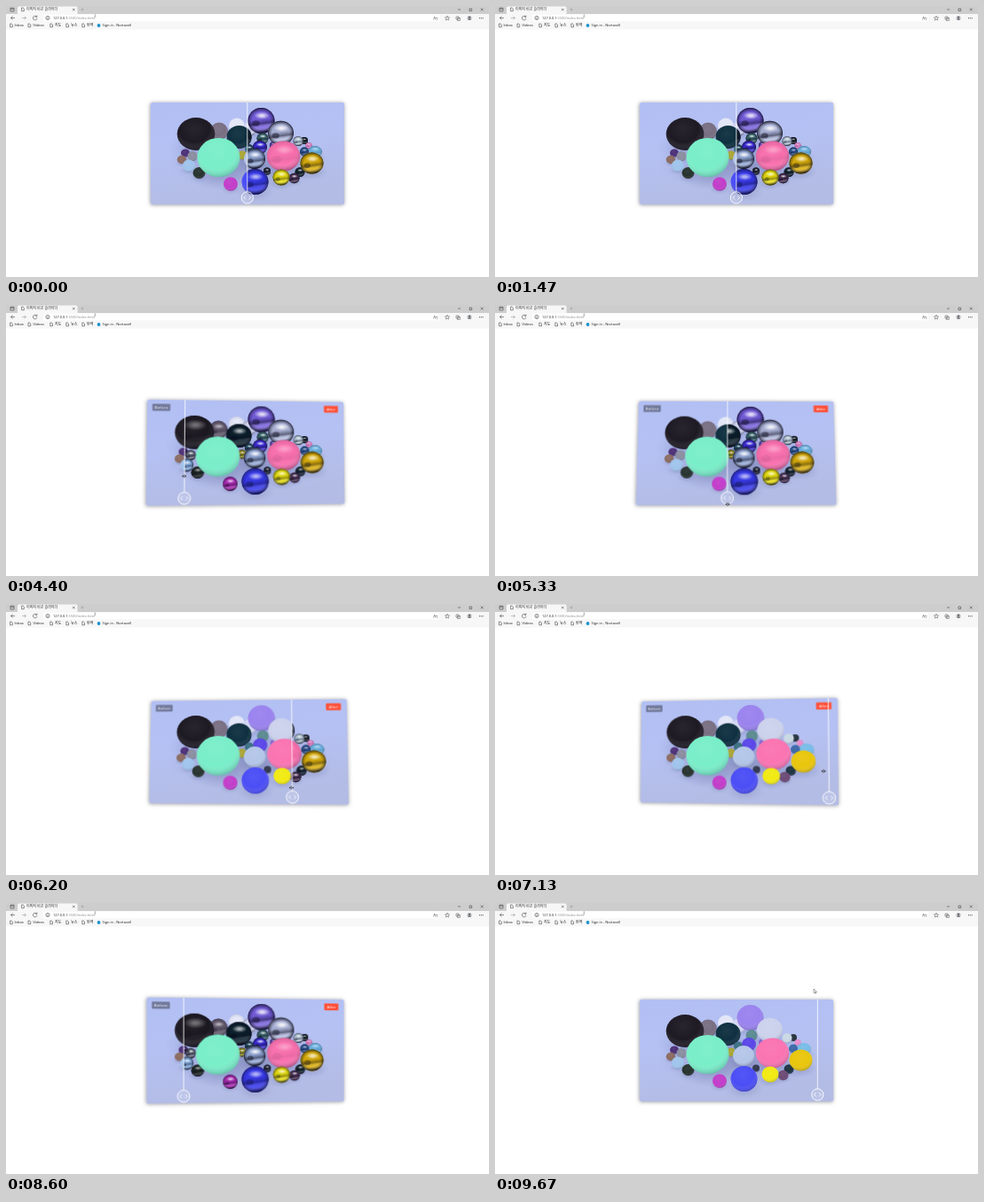
An HTML page that plays this animation: 544 px wide and 306 px high, repeating every 9.74 s.

```html
<!DOCTYPE html>
<html lang="ko">
<head>
<meta charset="utf-8">
<style>
html, body { margin: 0; width: 100%; height: 100%; overflow: hidden; background: #fff; }
svg { position: absolute; left: 0; top: 0; overflow: visible; }
text { font-family: "Open Sans", "Noto Sans CJK KR", "Noto Sans CJK", sans-serif; }
#card { position: absolute; left: 162.7px; top: 109.2px; width: 217.5px; height: 114.5px;
  border-radius: 1.5px; box-shadow: -.4px .4px 4px rgba(35, 38, 60, .5); }
#card svg { width: 217.5px; height: 114.5px; }
#card .scene { overflow: hidden; border-radius: 1.5px; }
.deepen { mix-blend-mode: multiply; }
</style>
</head>
<body>
<svg width="544" height="306" fill="none" stroke="#444" stroke-width=".6">
  <g stroke="none">
    <path fill="#cdcdcd" d="M0 0H544V9H0Z"/>
    <path fill="#f7f7f7" d="M0 9H13V2q0-1.5 1.5-1.5H79q1.5 0 1.5 1.5V9H544V26.5H0Z"/>
    <rect x="42" y="9.8" width="446" height="7.4" rx="1.2" fill="#fff"/>
    <circle cx="104.5" cy="22" r="1.9" fill="#1b93cf"/>
    <circle cx="522" cy="13.5" r="2.6" fill="#b9bcc2"/>
    <circle cx="522" cy="12.8" r="1" fill="#555"/>
    <path fill="#555" d="M520.2 15.5q1.8-2.6 3.6 0Z"/>
    <g fill="#222" font-size="4">
      <text x="23" y="5.4">이미지 비교 슬라이더</text>
      <text x="53" y="15" font-size="3.9">127.0.0.1<tspan fill="#8a8a8a">:5500/index.html</tspan></text>
      <text x="9.5" y="23.4">Inbox</text>
      <text x="30.5" y="23.4">Videos</text>
      <text x="55" y="23.4">지도</text>
      <text x="73" y="23.4">뉴스</text>
      <text x="91" y="23.4">번역</text>
      <text x="108.5" y="23.4">Sign in - Nortavell</text>
    </g>
    <path fill="#444" d="M533 13.2h1v1h-1zM534.8 13.2h1v1h-1zM536.6 13.2h1v1h-1z"/>
  </g>
  <path d="M5 2.2H9V6H5ZM5 3.3H9M75 2.8l2.6 2.6M77.6 2.8L75 5.4M509 4h3M522 3h2.6v2.6H522ZM534.8 2.6l2.8 2.8M537.6 2.6l-2.8 2.8"/>
  <path stroke="#999" d="M84.5 4h3M86 2.5v3M18 13.5h4.5M20.7 11.7l1.8 1.8-1.8 1.8"/>
  <path d="M10 13.5H5.5M7.5 11.5l-2 2 2 2M34.6 12.2A2.3 2.3 0 1 0 35 14M34.9 10.6v1.8h-1.8M47 13v2M47 11.8v.6"/>
  <circle cx="47" cy="13.5" r="2.1"/>
  <path stroke="#666" d="M481.5 15.5l1.2-3.5 1.2 3.5M484 13.5h2.4M484.8 15.3h1.6M497 11.2l.7 1.7 1.9.1-1.5 1.2.5 1.8-1.6-1-1.6 1 .5-1.8-1.5-1.2 1.9-.1ZM507 12h3v3h-3ZM508.4 13.4h3v3h-3Z"/>
  <path id="pages"/>
  <path stroke="#555" stroke-width=".5" d="M100.3 9.3v3.8"/>
</svg>

<div id="card">
  <svg id="before" class="scene" viewBox="163 109.5 217.5 114.5">
    <defs>
      <linearGradient id="sky" x2=".25" y2="1"><stop stop-color="#b2bff3"/><stop offset=".5" stop-color="#b5c1f3"/><stop offset="1" stop-color="#b3bce4"/></linearGradient>
      <radialGradient id="floor"><stop stop-color="#4a4f86" stop-opacity=".5"/><stop offset=".55" stop-color="#626a9f" stop-opacity=".25"/><stop offset="1" stop-color="#8088b8" stop-opacity="0"/></radialGradient>
      <radialGradient id="soft" cx=".45" cy=".35" r=".68"><stop stop-color="#fff" stop-opacity=".05"/><stop offset=".6" stop-color="#fff" stop-opacity="0"/><stop offset="1" stop-color="#113" stop-opacity=".25"/></radialGradient>
      <linearGradient id="metal" x2=".15" y2="1"><stop stop-color="#080818" stop-opacity=".45"/><stop offset=".22" stop-color="#080818" stop-opacity=".05"/><stop offset=".52" stop-color="#080818" stop-opacity=".1"/><stop offset=".68" stop-color="#080818" stop-opacity=".5"/><stop offset=".82" stop-color="#fff" stop-opacity=".15"/><stop offset="1" stop-color="#080818" stop-opacity=".6"/></linearGradient>
      <radialGradient id="rim"><stop offset=".68" stop-color="#080818" stop-opacity="0"/><stop offset=".9" stop-color="#080818" stop-opacity=".4"/><stop offset="1" stop-color="#080818" stop-opacity=".9"/></radialGradient>
      <radialGradient id="shine"><stop offset=".2" stop-color="#fff" stop-opacity=".9"/><stop offset="1" stop-color="#fff" stop-opacity="0"/></radialGradient>
    </defs>
  </svg>
  <svg id="after" class="scene" viewBox="163 109.5 217.5 114.5"></svg>
  <svg viewBox="0 0 217.5 114.5">
    <g id="labels" font-size="4.3" fill="#fff" text-anchor="middle">
      <rect x="5.4" y="4.5" width="19.2" height="7.8" rx=".8" fill="#666d8c" fill-opacity=".85"/>
      <text x="15" y="10" letter-spacing=".2">Before</text>
      <rect x="195.4" y="4.5" width="16.2" height="7.8" rx=".8" fill="#ff5139"/>
      <text x="203.5" y="10">After</text>
    </g>
    <g id="slider" fill="none" stroke="#fff" stroke-width=".9">
      <path d="M0 0V100.8" stroke-opacity=".9"/>
      <circle cy="107.4" r="6.6" fill="#fff" fill-opacity=".12"/>
      <path d="M-1.8 105.4l-2 2 2 2M1.8 105.4l2 2-2 2"/>
    </g>
  </svg>
</div>

<svg width="544" height="306">
  <g id="pointer" stroke="#222" stroke-width=".4">
    <path id="arrow" fill="#fff" d="M0 0V4.6L1.1 3.6 1.9 5.3 2.6 5 1.9 3.4H3.3Z"/>
    <path id="resize" fill="#222" d="M-.4-2V2M.4-2V2M-.6 0H-2.3l.8-.7v1.4l-.8-.7M.6 0H2.3l-.8-.7v1.4l.8-.7"/>
  </g>
</svg>

<script>
const $ = id => document.getElementById(id);

const page = (x, y) => `M${x} ${y}h1.6l1.1 1.1v2.7h-2.7Z`;
$('pages').setAttribute('d', page(17.6, 2) +
  [4.6, 25, 49.8, 67.8, 85.8].map(x => page(x, 20)).join(''));

// x, y, radius, colour, metallic strength, vertical squash; back to front
const balls = [
  [240, 142, 10, '#796f82', .5, 1],
  [260, 136, 9, '#e2e6f7', .1, 1],
  [274, 139.5, 8, '#d3d7f2', .3, 1],
  [287.5, 130, 15, '#9a83ee', .95, .97],
  [289, 150, 6.5, '#5b8b90', .9, 1],
  [302, 158, 5, '#8467cf', .9, 1],
  [309.5, 144, 14.5, '#ccd2ec', 1, .94],
  [336, 152.5, 4, '#26333d', .7, 1],
  [329, 153, 5.5, '#c9d8e4', .8, 1],
  [341, 158, 3.6, '#e48ccc', .3, 1],
  [348, 165, 8, '#79bde8', .3, .8],
  [336, 165, 5, '#3c69a8', .6, 1],
  [202, 166.5, 5, '#4d3078', .6, .9],
  [210, 170, 5.5, '#8a8ea0', .9, 1],
  [198, 174, 5.3, '#8b6b62', .4, .9],
  [206, 181, 7, '#a0c4ec', .85, 1],
  [214, 145, 21.3, '#1e1a23', .2, .87],
  [262.5, 148.5, 14, '#0f3040', .75, .93],
  [286, 160, 8, '#5a45e8', .9, .95],
  [274, 162, 5, '#3c6f84', .9, 1],
  [266, 169, 5, '#a9a534', .7, 1],
  [294, 187, 4, '#32374e', .8, 1],
  [217.5, 189, 7, '#27332f', .6, .93],
  [239.5, 171.5, 24, '#79eec8', 0, .92],
  [280, 173, 12, '#b4c6e8', 1, .95],
  [312.5, 170, 18.8, '#fa74b2', .12, .9],
  [331, 188, 5.5, '#1e3343', .7, .95],
  [324.5, 195, 6, '#6c4b76', .9, .97],
  [344.5, 178, 13, '#e9c60c', .8, .92],
  [310, 194, 9.5, '#f1ea12', .75, .95],
  [253, 201.5, 8, '#c23dca', .75, .97],
  [280.5, 199, 15, '#4b4ef5', .65, .97]
];

const ellipse = (x, y, rx, ry, fill, opacity = 1, name = '') =>
  `<ellipse cx="${x}" cy="${y}" rx="${rx}" ry="${ry}" fill="${fill}" opacity="${opacity}" class="${name}"/>`;

const shadow = ([x, y, r]) => ellipse(x, y + r * .75, r * 1.5, r * .8, 'url(#floor)', .5);

function ball([x, y, r, colour, metal, squash], glossy) {
  const layer = (fill, opacity, name) => ellipse(x, y, r, r * squash, fill, opacity, name);
  const body = layer(colour) + layer('url(#soft)');
  if (!glossy || !metal) return body;
  return body + layer(colour, metal * .6, 'deepen') + layer('url(#metal)', metal) +
    ellipse(x - r * .4, y + r * .2, r * .28, r * .22, '#080818', metal * .45) +
    layer('url(#rim)', metal) +
    ellipse(x + r * .05, y - r * .38, r * .58, r * .28, 'url(#shine)', .25 + metal * .65);
}

function drawScene(svg, glossy) {
  svg.innerHTML += `<rect x="163" y="109" width="218" height="116" fill="url(#sky)"/>` +
    ellipse(274, 177, 92, 34, 'url(#floor)', .8) +
    balls.map(shadow).join('') +
    balls.map(b => ball(b, glossy)).join('');
}
drawScene($('before'), false);
drawScene($('after'), true);

const LOOP = 9740, ENTER = 2600, LEAVE = 9280, LAG = 40;
const centre = { x: 271.5, y: 166.5 };
// time, x, y of the mouse
const route = [
  [2000, 100, 11], [2600, 271, 108], [3300, 246.5, 156], [3900, 235, 172],
  [4500, 198, 195], [5330, 262, 225], [6100, 320, 208],
  [7080, 371, 189], [7600, 340, 181], [8550, 202, 168], [9280, 363, 109], [9600, 359, 97]
];
const smooth = v => { v = Math.min(1, Math.max(0, v)); return v * v * (3 - 2 * v); };

function mouseAt(t) {
  const next = Math.max(1, route.findIndex(k => k[0] > t));
  const i = t >= route.at(-1)[0] ? route.length - 1 : next;
  const [t0, x0, y0] = route[i - 1], [t1, x1, y1] = route[i];
  const f = smooth((t - t0) / (t1 - t0));
  return { x: x0 + (x1 - x0) * f, y: y0 + (y1 - y0) * f };
}

function render(now) {
  const t = Math.floor((now % LOOP) * .015 + .1) / .015;
  const mouse = mouseAt(t);
  const held = mouseAt(Math.min(LEAVE, Math.max(ENTER, t - LAG)));
  const hover = smooth((t - ENTER) / 400) * (1 - smooth((t - LEAVE) / 350));
  const inside = t >= ENTER && t < LEAVE;

  const tiltX = (held.y - centre.y) / 57.25 * 4 * hover;
  const tiltY = (centre.x - held.x) / 108.75 * 5 * hover;
  $('card').style.transform =
    `perspective(283px) rotateX(${tiltX}deg) rotateY(${tiltY}deg) scale(${1 + .02 * hover})`;

  const split = (t < ENTER ? 271.5 : held.x) - 162.7;
  $('after').style.clipPath = `inset(0 0 0 ${split}px)`;
  $('slider').setAttribute('transform', `translate(${split})`);
  $('labels').setAttribute('opacity', hover);

  $('pointer').setAttribute('transform', `translate(${mouse.x} ${mouse.y})`);
  $('pointer').setAttribute('visibility', t > 2000 ? 'visible' : 'hidden');
  $('arrow').setAttribute('opacity', inside ? 0 : 1);
  $('resize').setAttribute('opacity', inside ? 1 : 0);
  requestAnimationFrame(() => render(performance.now()));
}
render(performance.now());
</script>
</body>
</html>
```
